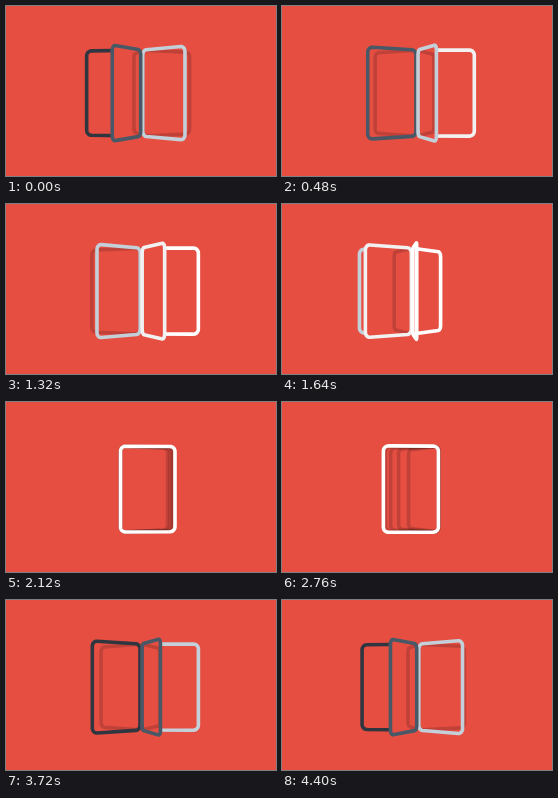
Animation of 270 by 170 pixels, one loop 4.44 s. Source, as an HTML page with a canvas:

```html
<!DOCTYPE html>
<html lang="en">
<head>
<meta charset="utf-8">
<title>Turning pages</title>
<style>
  html, body { margin: 0; width: 100%; height: 100%; overflow: hidden; background: #e74e42; }
  canvas { display: block; width: 270px; height: 170px; }
</style>
</head>
<body>
<canvas id="stage" width="270" height="170"></canvas>
<script>
const ctx = document.getElementById('stage').getContext('2d');
const BACK = '#e74e42', SHADE = 0.17;
const LOOP = 4440, START = 2660;          // the book starts to open at START
const CX = 135, CY = 87.1, DEPTH = 475;
const CARD = { w: 58.5, h: 89.5, line: 3.6, r: 5 };
const COLORS = ['#2f3640', '#485866', '#c3d0d9', '#f1f1f1', '#ffffff'];

// Fan: cards 72 degrees apart, turning slowly at a constant rate
const GAP = 72, SPEED = 0.057, LEAD = 88;
const FOLD = 1400, CLOSE = 2540;          // fold duration, start of closing

const clamp = v => Math.max(0, Math.min(1, v));
const ramp = (t, from, to) => clamp((t - from) / (to - from));
const mix = (a, b, p) => a + (b - a) * p;
const smooth = u => (1 - Math.cos(Math.PI * u)) / 2;
const rad = deg => deg * Math.PI / 180;

// 0 lies right, 90 faces the viewer, 180 lies left; the book goes from -180 to 360
function angleOf(k, t) {
  const fan = LEAD + SPEED * t - GAP * k;
  const open = 1 - (1 - ramp(t, 0, FOLD)) ** 3;
  const close = ramp(t, CLOSE, CLOSE + FOLD) ** 3;
  return mix(mix(-180, fan, open), 360, close);
}

function spineAt(t) {
  const open = smooth(ramp(t, 0, 860));
  const close = smooth(ramp(t, 3100, LOOP));
  return mix(mix(159, 135.5, open), 100.5, close);
}

// How much of a card's own colour shows; the rest is shade
function frontOf(k, angle, t) {
  const front = ramp(angle, -5, 0) * ramp(angle, 201, 196);
  const firstCover = k === 4 ? ramp(t, 980, 860) : 0;
  const lastCover = k === 0 ? ramp(t, 3240, 3340) : 0;
  return Math.max(front, firstCover, lastCover);
}

const outline = (() => {
  const { w, h, line, r } = CARD, m = line / 2, points = [];
  const left = m + r, right = w - left, half = h / 2 - left;
  const corners = [[right, half], [left, half], [left, -half], [right, -half]];
  corners.forEach(([x, y], q) => {
    for (let i = 0; i <= 6; i++) {
      const a = (q + i / 6) * Math.PI / 2;
      points.push([x + r * Math.cos(a), y + r * Math.sin(a)]);
    }
  });
  return points;
})();

function cardPath(spine, angle) {
  const c = Math.cos(rad(angle)), s = Math.sin(rad(angle));
  const path = new Path2D();
  for (const [u, y] of outline) {
    const zoom = DEPTH / (DEPTH - u * s);
    path.lineTo(CX + (spine + u * c - CX) * zoom, CY + y * zoom);
  }
  path.closePath();
  return path;
}

function drawShades(cards) {
  ctx.strokeStyle = '#000';
  for (const card of cards) {
    ctx.globalAlpha = SHADE * (1 - card.front);
    ctx.stroke(card.path);
  }
}

function draw(time) {
  const t = (time - START + LOOP) % LOOP;
  const spine = spineAt(t);
  const cards = COLORS.map((color, k) => {
    const angle = angleOf(k, t);
    return {
      color: k === 0 && t > 3200 ? '#ffffff' : color,
      lift: Math.sin(rad(angle)),
      front: frontOf(k, angle, t),
      path: cardPath(spine, angle)
    };
  });

  ctx.globalAlpha = 1;
  ctx.fillStyle = BACK;
  ctx.fillRect(0, 0, 270, 170);
  ctx.lineWidth = CARD.line;
  ctx.lineJoin = 'round';
  drawShades(cards);

  const faces = cards.filter(c => c.front > 0).sort((a, b) => a.lift - b.lift);
  for (const card of faces) {
    // each face is opaque, with the shades painted on it
    ctx.save();
    ctx.clip(card.path);
    ctx.globalAlpha = card.front;
    ctx.fillStyle = BACK;
    ctx.fill(card.path);
    drawShades(cards);
    ctx.restore();
    ctx.globalAlpha = card.front;
    ctx.strokeStyle = card.color;
    ctx.stroke(card.path);
  }
}

const begin = performance.now();
function tick() {
  draw((performance.now() - begin) % LOOP);
  requestAnimationFrame(tick);
}
tick();
</script>
</body>
</html>
```
